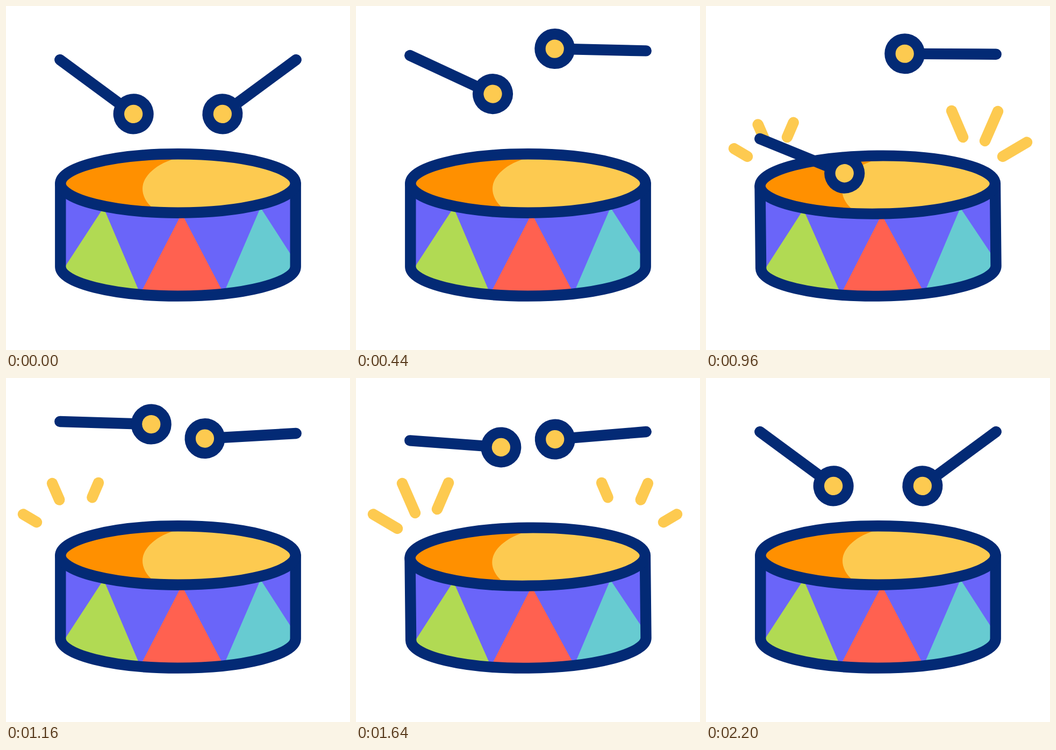
Write an HTML page that moves like this. It is 640 px wide and 640 px high and loops after 2400 ms.

```html
<!DOCTYPE html>
<html lang="en">
<head>
<meta charset="utf-8">
<title>Drum</title>
<style>
  html, body { margin: 0; height: 100%; overflow: hidden; background: #fff; }
  svg { display: block; width: 100%; height: 100%; }
  .line { fill: none; stroke: #032a75; stroke-width: 20.4; stroke-linecap: round; stroke-linejoin: round; }
  .ray { stroke: #fdca50; stroke-width: 20.4; stroke-linecap: round; }
</style>
</head>
<body>
<svg viewBox="0 0 640 640">
  <defs>
    <path id="body" d="M101.3 330V485C101.3 515 199 539.6 320 539.6S538.7 515 538.7 485V330Z"/>
    <ellipse id="head" cx="320" cy="330" rx="218.7" ry="54.7"/>
    <clipPath id="inBody"><use href="#body"/></clipPath>
    <clipPath id="inHead"><use href="#head"/></clipPath>
    <g id="stick">
      <path class="line" d="M0 0H150"/>
      <circle class="line" cx="170" r="27.3" style="fill:#fdca50"/>
    </g>
  </defs>
  <g id="rays"></g>
  <g id="drum">
    <g clip-path="url(#inBody)">
      <use href="#body" fill="#6a65f9"/>
      <path fill="#b1da53" d="M181.5 375L260 560H61Z"/>
      <path fill="#ff6150" d="M327 386L418 560H237Z"/>
      <path fill="#67cbd1" d="M473.5 375L593 560H394Z"/>
    </g>
    <use href="#body" class="line"/>
    <use href="#head" fill="#fdca50"/>
    <path clip-path="url(#inHead)" fill="#ff9000"
      d="M320 282C280 293 254 316 254 340C254 353 261 366 273 376L280 400H90V270Z"/>
    <use href="#head" class="line"/>
  </g>
  <use id="left" href="#stick"/>
  <use id="right" href="#stick"/>
</svg>
<script>
const LOOP = 2400, STEP = 40;
const $ = id => document.getElementById(id);
const clamp = x => Math.max(0, Math.min(1, x));

const lin = x => x;
const into = x => x * x;
const out = x => 1 - (1 - x) ** 2;
const soft = x => (1 - Math.cos(Math.PI * x)) / 2;

// time, handle height, angle, easing towards this pose
const leftKeys = [
  [220, 100, 36.4],
  [440, 92, 24.9, into], [680, 81, 1.7, out], [720, 82, 1.7, lin],
  [800, 148.5, -7.3, lin], [960, 247, 22.2, lin],
  [1160, 81, 1.7, out], [1320, 82, 1.7, lin],
  [1400, 148.5, -7.3, lin], [1560, 247, 22.2, lin],
  [1680, 100, 2, out], [1880, 100, 21.7, into], [2100, 100, 36.4, out]
];
const rightKeys = [
  [220, 100, 36.4],
  [480, 83, -2.2, out], [520, 83, -2.2, lin], [800, 214, 32.8, lin],
  [1000, 84.5, -1.7, out], [1120, 84.5, -1.7, lin], [1400, 214, 32.8, lin],
  [1560, 100, 2, out], [1580, 100, 2, lin], [1910, 100, 36.4, soft]
];

// hit time and side: 1 right, -1 left
const hits = [[800, 1], [920, -1], [1400, 1], [1520, -1]];

// outer and inner end of each ray on the right side
const rays = [[457, 195, 478, 244], [543, 196, 519, 251], [597, 253.5, 552, 280]];
const rayLines = [1, -1].flatMap(side => rays.map(ends => {
  const el = document.createElementNS("http://www.w3.org/2000/svg", "line");
  el.setAttribute("class", "ray");
  $("rays").append(el);
  return { el, side, ends };
}));

function pose(keys, t) {
  const i = keys.findIndex(k => k[0] > t);
  if (i === 0) return keys[0].slice(1, 3);
  if (i < 0) return keys.at(-1).slice(1, 3);
  const a = keys[i - 1], b = keys[i];
  const f = b[3]((t - a[0]) / (b[0] - a[0]));
  return [1, 2].map(n => a[n] + (b[n] - a[n]) * f);
}

function drawRay({ el, side, ends: [x1, y1, x2, y2] }, t) {
  const hit = hits.find(h => h[1] === side && t > h[0] && t < h[0] + 280);
  el.style.display = hit ? "" : "none";
  if (!hit) return;
  const age = t - hit[0];
  const head = out(clamp(age / 120)), tail = into(clamp((age - 160) / 120));
  const put = (f, n) => {
    const x = x2 + (x1 - x2) * f;
    el.setAttribute("x" + n, side > 0 ? x : 629 - x);
    el.setAttribute("y" + n, y2 + (y1 - y2) * f);
  };
  put(head, 1);
  put(tail, 2);
}

function draw(t) {
  const [ly, la] = pose(leftKeys, t), [ry, ra] = pose(rightKeys, t);
  $("left").setAttribute("transform", `translate(100.3 ${ly}) rotate(${la})`);
  $("right").setAttribute("transform", `translate(539.7 ${ry}) scale(-1 1) rotate(${ra})`);

  let tilt = 0, squash = 0;
  for (const [at, side] of hits) {
    const bump = Math.sin(Math.PI * clamp((t - at) / 160));
    tilt += 0.85 * side * bump;
    squash += 0.017 * bump;
  }
  $("drum").setAttribute("transform",
    `rotate(${tilt} 320 407) translate(0 ${549 * squash}) scale(1 ${1 - squash})`);

  rayLines.forEach(r => drawRay(r, t));
}

const start = performance.now();
function tick() {
  const t = (performance.now() - start) % LOOP;
  draw(Math.floor(t / STEP) * STEP);
  requestAnimationFrame(tick);
}
tick();
</script>
</body>
</html>
```
